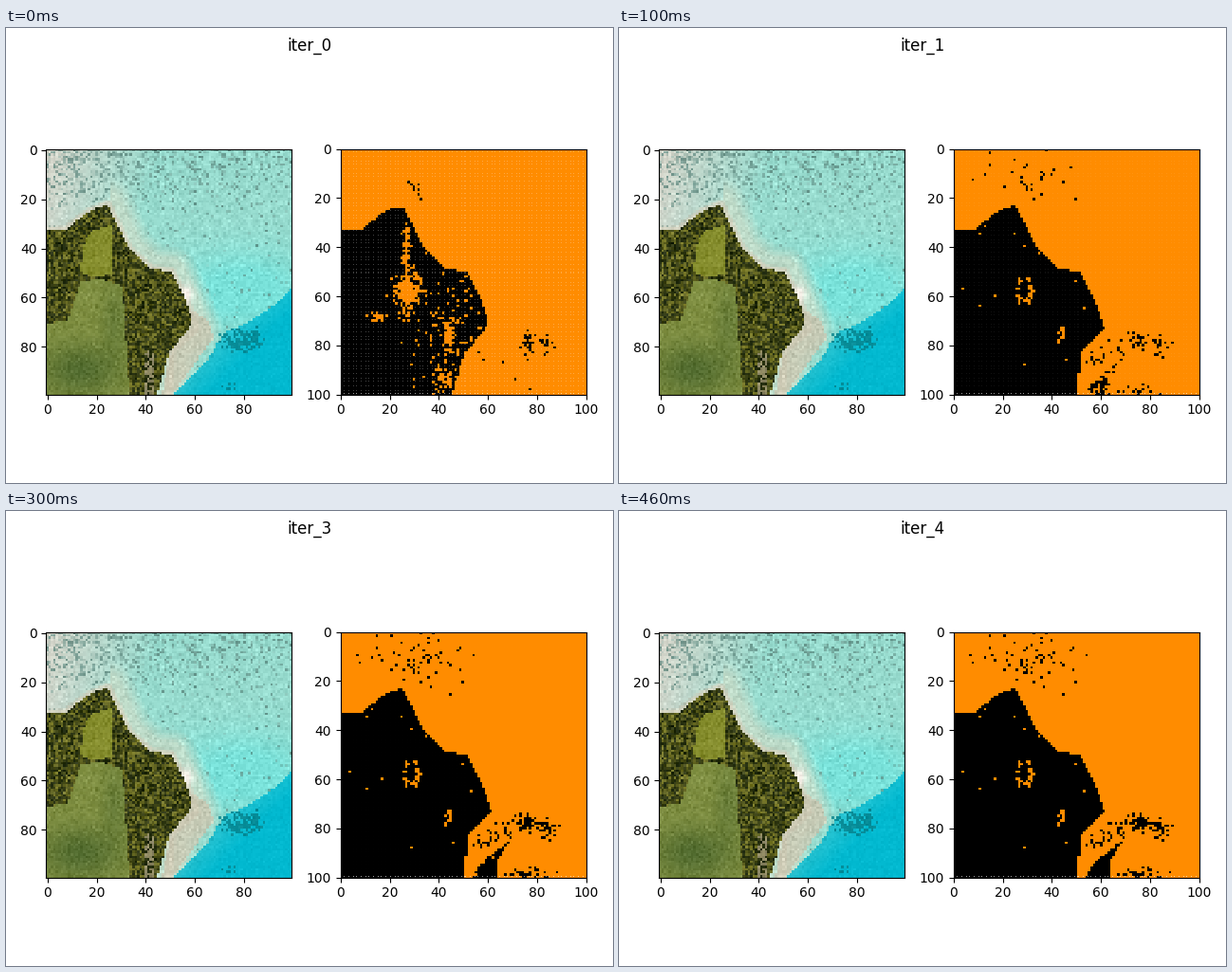
Recreate the animation shown at these times as a matplotlib script. Size 640 by 480 pixels, loop 0.5 s.

```python
import numpy as np
import matplotlib.pyplot as plt
from matplotlib.animation import FuncAnimation
from matplotlib.path import Path

N, FRAMES = 100, 5
SIDE, BOTTOM = 259.07, 93.3
LEFT_X, RIGHT_X = 42.4, 352.7
ORANGE = np.array([255, 140, 0]) / 255

rng = np.random.default_rng(7)
Y, X = np.mgrid[0:N, 0:N] + 0.5
CELLS = np.column_stack([X.ravel(), Y.ravel()])
noise = rng.random((N, N))

COAST = [(0, 33.5), (8, 33), (17, 26), (25, 22.5), (34, 41), (43, 49), (51, 50), (57, 62)]
SLIM_TAIL = [(59.5, 71), (50, 83), (45, 100), (0, 100)]
WIDE_TAIL = [(61, 73), (51, 82), (50, 100), (0, 100)]


def inside(points):
    return Path(points).contains_points(CELLS).reshape(N, N)


def blob(x, y, rx, ry):
    return np.exp(-((X - x) / rx) ** 2 - ((Y - y) / ry) ** 2)


def distance(points):
    """Distance of every cell from a polyline."""
    best = np.full((N, N), np.inf)
    for (x0, y0), (x1, y1) in zip(points, points[1:]):
        dx, dy = x1 - x0, y1 - y0
        t = np.clip(((X - x0) * dx + (Y - y0) * dy) / (dx * dx + dy * dy), 0, 1)
        best = np.minimum(best, np.hypot(X - x0 - t * dx, Y - y0 - t * dy))
    return best


def rgb(*c):
    return np.array(c) / 255


def mix(img, color, weight):
    w = np.clip(weight, 0, 1)[..., None]
    return img * (1 - w) + color * w


def aerial_view():
    # shallow water, paler and speckled towards the top left
    img = np.ones((N, N, 3)) * rgb(152, 220, 207)
    img = mix(img, rgb(122, 226, 218), 1.3 * blob(80, 58, 28, 16))
    img = mix(img, rgb(212, 214, 203), 1.1 - X / 42 - Y / 160)
    density = 0.4 * np.exp(-(Y / 19) ** 2) * np.clip(1.2 - X / 120, 0, 1) + 0.03
    img = mix(img, rgb(92, 135, 126), (rng.random((N, N)) < density) * rng.uniform(0.2, 0.8, (N, N)))

    # sand along the shore
    edge = distance(COAST + WIDE_TAIL[:-1])
    img = mix(img, rgb(194, 219, 200), 0.9 * np.clip(1.8 - edge / 6, 0, 1) * (X > 26))
    img = mix(img, rgb(212, 206, 186), 0.8 * np.clip(1.5 - edge / 1.5, 0, 1))

    # deep water with dark reefs
    deep = inside([(100, 56), (92, 64), (83, 70), (72, 75), (65, 87), (51, 100), (100, 100)])
    img = mix(img, rgb(2, 185, 208), deep * np.clip(0.75 + (X + Y - 150) / 60, 0, 1))
    reef = blob(77, 78, 7, 5) + blob(85, 77, 4, 4) + 0.5 * blob(75, 96, 6, 3)
    img = mix(img, rgb(5, 128, 138), 0.8 * (reef * rng.random((N, N)) > 0.3))
    img = mix(img, rgb(202, 198, 176),
              0.75 * inside([(57, 64), (66, 70), (68, 77), (51, 100), (47, 100), (51, 82)]))
    img = mix(img, rgb(250, 244, 236), 1.1 * blob(57, 59, 2.5, 3.5))

    # woodland
    land = inside(COAST + SLIM_TAIL)
    canopy = rng.random((N, N))
    wood = mix(np.ones((N, N, 3)) * rgb(28, 38, 12), rgb(128, 128, 44), canopy ** 1.3)
    img = np.where(land[..., None], wood, img)
    img = mix(img, rgb(165, 155, 130), 0.7 * (distance([(42, 84), (42, 99)]) < 1.8) * (canopy > 0.4))

    # meadows
    upper = inside([(14, 50), (16, 36), (20, 33), (27, 31), (27, 51), (20, 52)])
    lower = inside([(0, 71), (9, 70), (14, 54), (22, 53), (31, 56), (34, 100), (0, 100)])
    img = mix(img, rgb(136, 144, 46), 0.95 * upper)
    img = mix(img, rgb(130, 146, 68), 0.95 * lower)
    img = mix(img, rgb(70, 98, 42), lower * (0.8 * blob(14, 90, 15, 10) + 0.4 * blob(28, 70, 5, 14)))

    grain = rng.normal(0, 0.03, (N, N, 1)) * np.where(deep, 0.4, 1)[..., None]
    return np.clip(img + grain, 0, 1)


def first_mask():
    mask = inside(COAST + SLIM_TAIL) & (Y > 24)
    clearing = (blob(27, 58, 4, 6) + blob(26.5, 40, 1.3, 10) + blob(15, 68, 3, 1.5)
                + 0.6 * blob(44, 75, 1.5, 6) + 0.7 * blob(42, 93, 3, 4)
                + 0.13 * blob(44, 72, 12, 22))
    mask &= noise > 1.3 * clearing
    reef = blob(76, 78, 2, 4) + 0.6 * blob(83, 79, 2, 3)
    specks = 0.15 * blob(30, 16, 3, 5) + 0.02 * blob(62, 90, 9, 9)
    return mask | (noise < 0.8 * reef + specks)


def later_mask(step):
    grown = 1 - 0.5 * 0.4 ** (step - 1)
    mask = inside(COAST + WIDE_TAIL)
    ring = np.abs(np.hypot((X - 28.5) / 3, (Y - 57.5) / 4.5) - 1) < 0.3
    mask &= noise > 0.6 * ring + 0.45 * blob(44, 74, 1.6, 3) + 0.004
    specks = 0.12 * blob(29, 11, 19, 8) + 0.3 * blob(29, 14, 2.5, 4)
    reef = blob(76, 77, 3, 3) + 0.8 * blob(83, 80, 3, 3) + 0.5 * blob(75, 99, 9, 2.5)
    strip = 0.3 * np.clip(1 - distance([(57, 87), (70, 77)]) / 5, 0, 1)
    wedge = inside([(53, 100), (56, 94), (68, 85), (63, 93), (63, 100)])
    return mask | (noise < grown * (1.2 * reef + specks + strip + 1.05 * wedge))


def panel(step):
    """Cells snapped to two or three pixels, with gaps where wide cells meet."""
    cell = np.arange(int(SIDE)) * N // int(SIDE)
    wide = np.bincount(cell)[cell] == 3
    seam = wide & (np.diff(cell, prepend=-1) > 0)
    mask = later_mask(step) if step else first_mask()
    img = np.where(mask[..., None], 0.0, ORANGE)[np.ix_(cell, cell)]
    gap = np.outer(seam, seam) * 0.26 ** (step + 1)
    gap[-2, seam] = 0.6
    return mix(img, np.ones(3), gap)


fig = plt.figure(figsize=(6.4, 4.8), dpi=100)


def add_panel(left, img, extent, ticks):
    ax = fig.add_axes([left / 640, BOTTOM / 480, SIDE / 640, SIDE / 480])
    view = ax.imshow(img, extent=extent, interpolation="nearest", aspect="auto")
    ax.set_xticks(ticks)
    ax.set_yticks(ticks)
    return view


panels = [panel(i) for i in range(FRAMES)]
add_panel(LEFT_X, aerial_view(), (-0.5, N - 0.5, N - 0.5, -0.5), range(0, 100, 20))
view = add_panel(RIGHT_X, panels[0], (0, N, N, 0), range(0, 101, 20))
title = fig.suptitle("iter_0")


def update(i):
    view.set_data(panels[i])
    title.set_text(f"iter_{i}")
    return view, title


anim = FuncAnimation(fig, update, frames=FRAMES, interval=100, repeat=True, repeat_delay=0)
plt.show()
```
